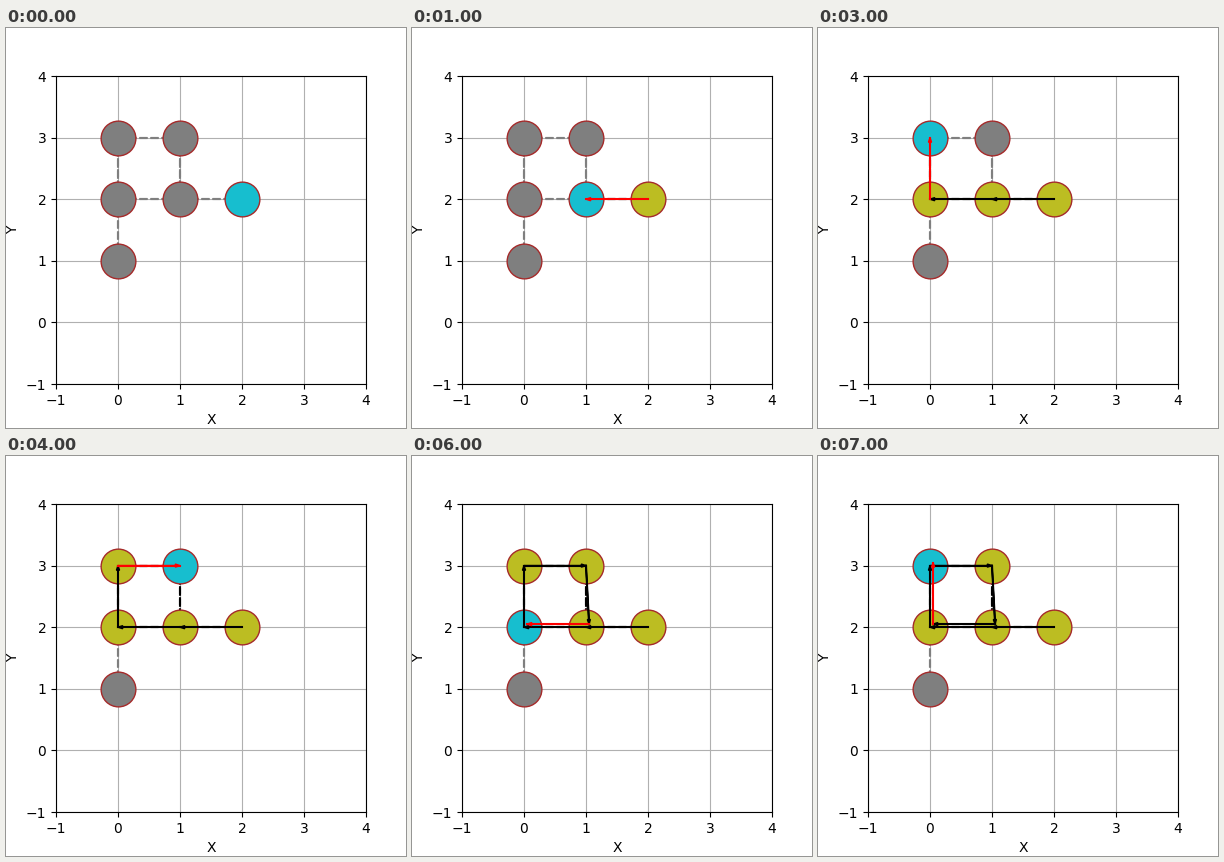
Animation of 400 by 400 pixels, one loop 8000 ms. Source, as a matplotlib script:

```python
from itertools import permutations

import matplotlib.pyplot as plt
from matplotlib.animation import FuncAnimation

ROWS = {1: 1, 2: 3, 3: 2}  # nodes in each row, counted from x = 0
NODES = [(x, y) for y, count in ROWS.items() for x in range(count)]
# both directions of each link, as in an adjacency list
EDGES = [(a, b) for a, b in permutations(NODES, 2)
         if abs(a[0] - b[0]) + abs(a[1] - b[1]) == 1]
STEPS = 8
SHIFT = 0.05  # moves repeat visits aside so arrows stay apart


def make_walk(node, heading):
    """Go straight on while possible, otherwise turn right."""
    walk = [node]
    while len(walk) < STEPS:
        (x, y), (dx, dy) = walk[-1], heading
        ahead = x + dx, y + dy
        if ahead in NODES:
            walk.append(ahead)
        else:
            heading = dy, -dx
    return walk


WALK = make_walk((2, 2), (-1, 0))


def walk_point(i):
    x, y = WALK[i]
    offset = SHIFT * WALK[:i].count((x, y))
    return x + offset, y + offset


fig, ax = plt.subplots(figsize=(4, 4), dpi=100)


def node_color(node, step):
    if node == WALK[step]:
        return "tab:cyan"
    return "tab:olive" if node in WALK[:step] else "tab:gray"


def draw_line(a, b, **style):
    ax.plot([a[0], b[0]], [a[1], b[1]], lw=1.5, **style)


def draw_arrow(a, b, color):
    draw_line(a, b, color=color, zorder=3)
    ax.arrow(*a, b[0] - a[0], b[1] - a[1], head_width=0.05,
             length_includes_head=True, color=color, zorder=3)


def draw(step):
    ax.clear()
    ax.set(xlim=(-1, 4), ylim=(-1, 4), xlabel="X", ylabel="Y",
           xticks=range(-1, 5), yticks=range(-1, 5))
    ax.grid(True)

    seen = WALK[:step + 1]
    for a, b in EDGES:
        visited = a in seen and b in seen
        draw_line(a, b, ls="--", color="black" if visited else "tab:gray")
    for node in NODES:
        ax.plot(*node, "o", ms=25, color=node_color(node, step), mec="brown")
    for i in range(step):
        draw_arrow(walk_point(i), walk_point(i + 1),
                   "red" if i == step - 1 else "black")
    return ()


anim = FuncAnimation(fig, draw, frames=STEPS, interval=1000,
                     init_func=lambda: (), repeat=True)
plt.show()
```
